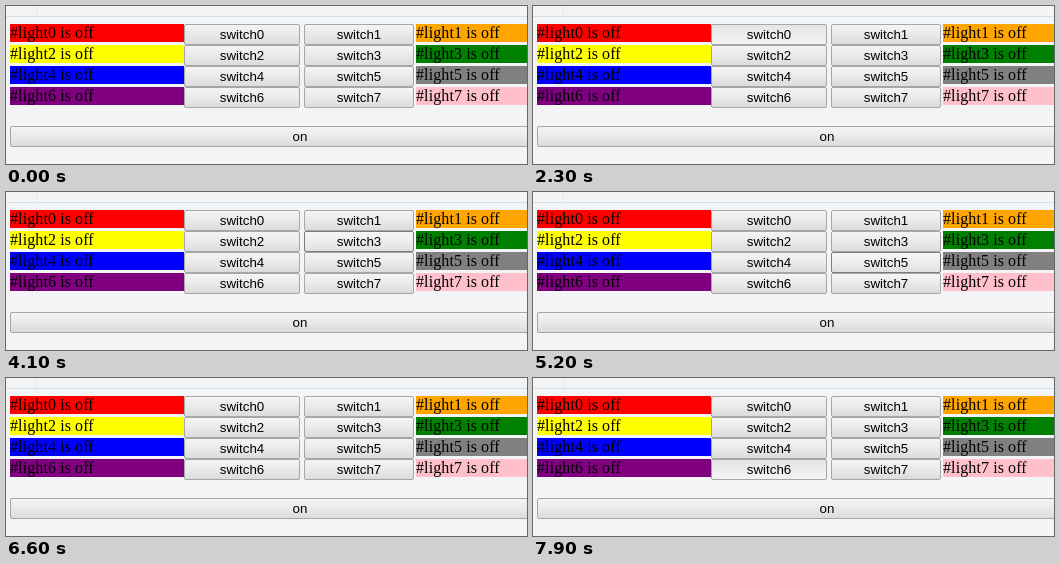
These frames come from a looping animation (521x158 px, 8000 ms). An HTML page:

```html
<!DOCTYPE html>
<html lang="en">
<head>
<meta charset="utf-8">
<style>
html, body { margin: 0; width: 521px; height: 158px; overflow: hidden; background: #f2f4f6; }
body { position: relative; }
div, button { position: absolute; box-sizing: border-box; white-space: nowrap; }
.rule { left: 0; top: 10px; width: 521px; height: 1px; background: #d5dfe5; }
.tick { left: 30px; top: 0; width: 1px; height: 10px; background: #e2e8ec; }
.light {
  height: 18px; color: #000; letter-spacing: .1px;
  font: 16px/18px "Liberation Serif", "Times New Roman", serif;
}
button {
  height: 21px; margin: 0; padding: 0; border: 1px solid #a6a6a6; border-radius: 2px;
  background: linear-gradient(#f4f4f4, #ededed 35%, #dcdcdc);
  font: 13.333px/19px "Liberation Sans", Arial, sans-serif; color: #000; outline: 0;
}
button.hover {
  border-color: #7c7c7c;
  background: linear-gradient(#f6f6f6, #f0f0f0 35%, #e0e0e0);
}
button.down {
  border-color: #a6a6a6;
  background: linear-gradient(#e4e4e4, #ececec 40%, #f3f3f3);
}
</style>
</head>
<body>
<div class="rule"></div>
<div class="tick"></div>
<script>
const colors = ['red', 'orange', 'yellow', 'green', 'blue', 'gray', 'purple', 'pink'];
const LOOP = 8000, PRESS = 100;

// Pointer route: time of arrival and switch (-1 is outside)
const route = [
  [0, -1], [800, 0], [3800, 1], [3900, 5], [4100, 3], [5200, 5],
  [5500, 6], [5700, 4], [6500, -1], [6700, 7], [7700, 6]
];
// Each click flips the light beside the pointer when the button is let go
const clicks = [2400, 3400, 4400, 4900, 5900, 6300, 6800, 7100, 8000];

function add(tag, left, top, width, text = '') {
  const el = document.createElement(tag);
  el.style.cssText = `left:${left}px;top:${top}px;width:${width}px`;
  el.textContent = text;
  return document.body.appendChild(el);
}

const cells = colors.map((color, i) => {
  const right = i % 2, top = 18 + 21 * (i >> 1);
  const light = add('div', right ? 410 : 4, top, 174);
  light.className = 'light';
  const button = add('button', right ? 298 : 178, top, right ? 110 : 116, 'switch' + i);
  return { color, light, button };
});
add('button', 4, 120, 580, 'on');

function draw() {
  const t = performance.now() % LOOP;
  const hover = route.findLast(([arrival]) => arrival <= t)[1];
  const pressed = clicks.some(c => t >= c - PRESS && t < c);
  const lit = clicks.filter(c => c <= t).length % 2 ? hover : -1;
  cells.forEach(({ color, light, button }, i) => {
    button.className = i !== hover ? '' : pressed ? 'down' : 'hover';
    light.textContent = `#light${i} is ${i === lit ? 'on' : 'off'}`;
    light.style.background = i === lit ? 'none' : color;
  });
  requestAnimationFrame(draw);
}
draw();
</script>
</body>
</html>
```
